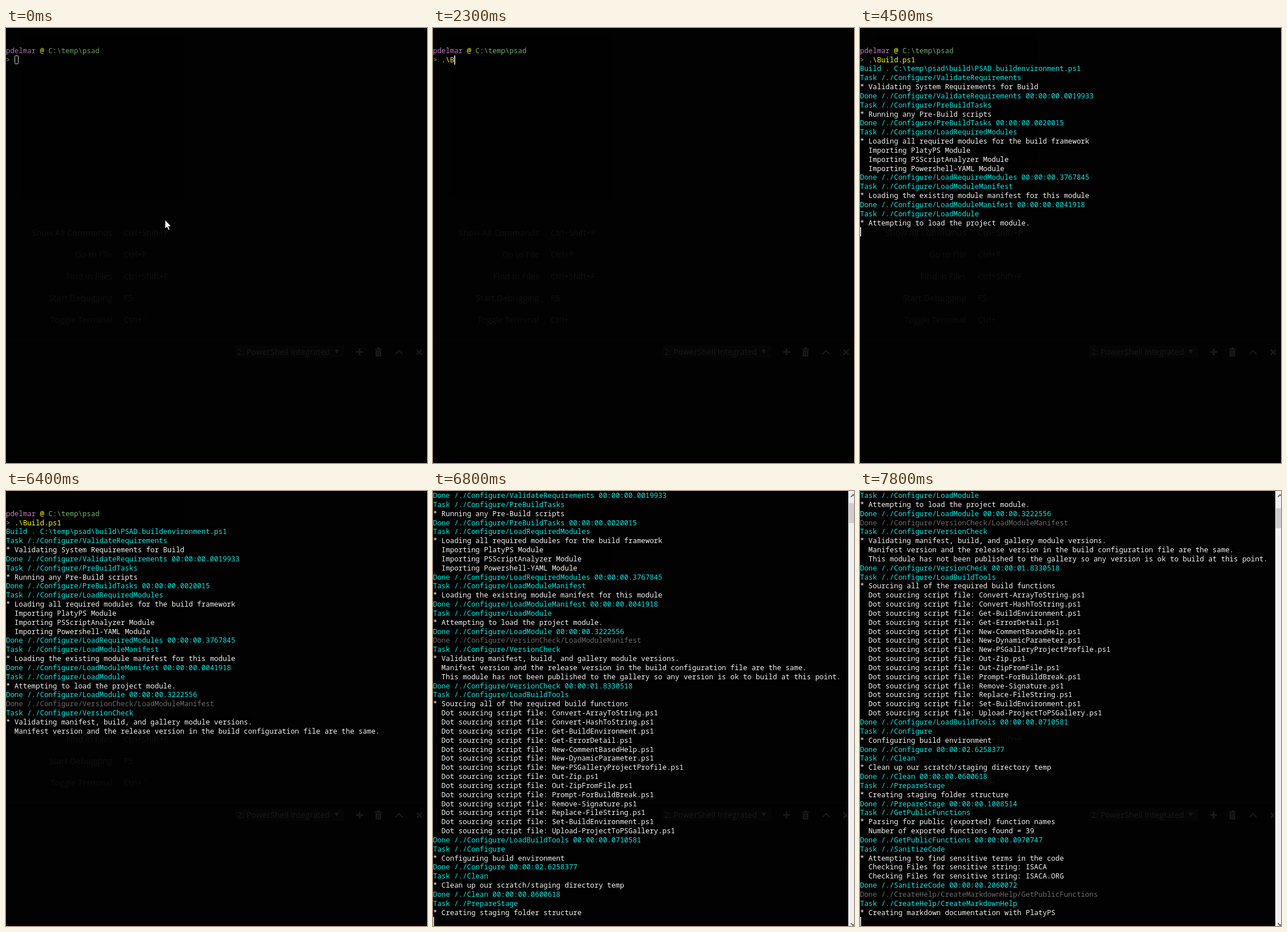
Recreate the animation shown at these times as an HTML page with a canvas. Size 737 by 760 pixels, loop 8 s.

```html
<!DOCTYPE html>
<html lang="en">
<head>
<meta charset="utf-8">
<title>Module build in a terminal</title>
<style>
  html, body { margin: 0; width: 100%; height: 100%; overflow: hidden; background: #020202; }
  canvas { display: block; }
</style>
</head>
<body>
<canvas id="stage" width="737" height="760"></canvas>
<script>
const W = 737, H = 760, LOOP = 8000;
const CELL = 7.435, LINE = 15.84, ROWS = 48;
const MONO = '12.4px "Noto Sans Mono", monospace';
const CYAN = '#00eeee', WHITE = '#f4f4f4', GREY = '#6c6c6c';
const GREEN = '#6cb365', PURPLE = '#c678c4', YELLOW = '#ffff00';
const ctx = document.getElementById('stage').getContext('2d');

const sourced = `Convert-ArrayToString Convert-HashToString Get-BuildEnvironment
Get-ErrorDetail New-CommentBasedHelp New-DynamicParameter
New-PSGalleryProjectProfile Out-Zip Out-ZipFromFile Prompt-ForBuildBreak
Remove-Signature Replace-FileString Set-BuildEnvironment
Upload-ProjectToPSGallery`.split(/\s+/)
  .map(name => `  Dot sourcing script file: ${name}.ps1`).join('\n');

// Output starts on terminal row 4, below the prompt.
const FIRST = 4;
const output = String.raw`Build . C:\temp\psad\build\PSAD.buildenvironment.ps1
Task /./Configure/ValidateRequirements
* Validating System Requirements for Build
Done /./Configure/ValidateRequirements 00:00:00.0019933
Task /./Configure/PreBuildTasks
* Running any Pre-Build scripts
Done /./Configure/PreBuildTasks 00:00:00.0020015
Task /./Configure/LoadRequiredModules
* Loading all required modules for the build framework
  Importing PlatyPS Module
  Importing PSScriptAnalyzer Module
  Importing Powershell-YAML Module
Done /./Configure/LoadRequiredModules 00:00:00.3767845
Task /./Configure/LoadModuleManifest
* Loading the existing module manifest for this module
Done /./Configure/LoadModuleManifest 00:00:00.0041918
Task /./Configure/LoadModule
* Attempting to load the project module.
Done /./Configure/LoadModule 00:00:00.3222556
Done /./Configure/VersionCheck/LoadModuleManifest
Task /./Configure/VersionCheck
* Validating manifest, build, and gallery module versions.
  Manifest version and the release version in the build configuration file are the same.
  This module has not been published to the gallery so any version is ok to build at this point.
Done /./Configure/VersionCheck 00:00:01.8330518
Task /./Configure/LoadBuildTools
* Sourcing all of the required build functions
${sourced}
Done /./Configure/LoadBuildTools 00:00:00.0710581
Task /./Configure
* Configuring build environment
Done /./Configure 00:00:02.6258377
Task /./Clean
* Clean up our scratch/staging directory temp
Done /./Clean 00:00:00.0600618
Task /./PrepareStage
* Creating staging folder structure
Done /./PrepareStage 00:00:00.1008514
Task /./GetPublicFunctions
* Parsing for public (exported) function names
  Number of exported functions found = 39
Done /./GetPublicFunctions 00:00:00.0970747
Task /./SanitizeCode
* Attempting to find sensitive terms in the code
  Checking Files for sensitive string: ISACA
  Checking Files for sensitive string: ISACA.ORG
Done /./SanitizeCode 00:00:00.2060072
Done /./CreateHelp/CreateMarkdownHelp/GetPublicFunctions
Task /./CreateHelp/CreateMarkdownHelp
* Creating markdown documentation with PlatyPS`.split('\n');

const COMMAND = String.raw`.\Build.ps1`;

// Each track is a list of [start time, value].
const typed = [[0, 0], [1700, 1], [1900, 2], [2300, 3], [2400, 5], [2500, 6],
  [2700, 7], [2800, 8], [3000, 9], [3200, 10], [3400, 11]];
const cursorLine = [[0, 3], [3900, 4], [4100, 7], [4200, 13], [4300, 15], [4500, 22],
  [4800, 27], [6700, 41], [6800, 54], [6900, 57], [7000, 62], [7200, 63], [7300, 67]];
const cursorOn = [[0, 1], [900, 0], [1400, 1], [5400, 0], [5900, 1], [6400, 0],
  [6700, 1], [7300, 0], [7800, 1]];
const textAlpha = [[0, 0.9], [200, 0.95], [300, 1]];
const pointer = [[0, [278.5, 335.5]], [200, [282, 335]], [300, [284.5, 334]], [600, null]];

const at = (track, t) => track.findLast(step => step[0] <= t)[1];

function rect(color, x, y, w, h) {
  ctx.fillStyle = color;
  ctx.fillRect(x, y, w, h);
}

function shape(points, fill, stroke, width = 1) {
  ctx.beginPath();
  points.forEach(([x, y]) => ctx.lineTo(x, y));
  if (fill) { ctx.closePath(); ctx.fillStyle = fill; ctx.fill(); }
  if (stroke) { ctx.strokeStyle = stroke; ctx.lineWidth = width; ctx.stroke(); }
}

function label(text, x, y, size, color, align = 'left') {
  ctx.font = `${size}px "Open Sans", sans-serif`;
  ctx.textAlign = align;
  ctx.fillStyle = color;
  ctx.fillText(text, x, y);
}

// Places one character per terminal cell, on an opaque background.
function cells(text, col, row, color, alpha = 1) {
  const top = Math.round(row * LINE);
  rect('#000', col * CELL, top, text.length * CELL, Math.round((row + 1) * LINE) - top);
  ctx.font = MONO;
  ctx.textAlign = 'left';
  ctx.fillStyle = color;
  ctx.globalAlpha = alpha;
  const base = Math.round(row * LINE + 12);
  [...text].forEach((ch, i) => ctx.fillText(ch, (col + i) * CELL, base));
  ctx.globalAlpha = 1;
}

function lineColor(text) {
  if (/^Done \S+$/.test(text)) return GREY;
  return /^(Task|Done|Build)/.test(text) ? CYAN : WHITE;
}

function drawEditor() {
  const dim = '#0f0f0f', icon = '#181818';
  rect('#020202', 0, 0, W, H);
  rect('#010101', 28, 13, 284, 284);
  [['Show All Commands', 'Ctrl+Shift+P'], ['Go to File', 'Ctrl+P'],
   ['Find in Files', 'Ctrl+Shift+F'], ['Start Debugging', 'F5'],
   ['Toggle Terminal', 'Ctrl+`']].forEach(([name, keys], i) => {
    const y = Math.round(362.5 + i * 38.15);
    label(name, 186, y, 14.8, dim, 'right');
    label(keys, 206, y, 14.4, dim);
  });
  rect('#060606', 0, 544, W, 1);
  rect('#050505', 401, 555, 191, 21);
  label('2: PowerShell Integrated', 405, 571, 14.3, icon);
  shape([[575, 562], [583, 562], [579, 569]], icon);
  rect(icon, 613, 564.5, 12, 3);
  rect(icon, 617.5, 560, 3, 12);
  rect(icon, 646, 560, 12, 2);
  rect(icon, 650, 558, 4, 2);
  rect(icon, 647, 563, 10, 11);
  rect('#080808', 650, 565, 1, 7);
  rect('#080808', 653, 565, 1, 7);
  shape([[682, 570], [688, 563.5], [694, 570]], null, icon, 2.2);
  shape([[719, 562], [728, 571]], null, icon, 2.5);
  shape([[728, 562], [719, 571]], null, icon, 2.5);
  rect('#060106', 0, 756, W, 4);
}

function drawScrollbar(scroll) {
  rect('#f0f0f0', 727, 0, 10, H);
  rect('#cdcdcd', 728, Math.round(16.5 + scroll * 0.68), 9, 35);
  shape([[731.5, 10.5], [735.5, 6.5], [739.5, 10.5]], null, '#555', 1.6);
  shape([[731.5, 755], [735.5, 759], [739.5, 755]], null, '#555', 1.6);
}

function drawCursor(t, line, scroll, count) {
  const col = line === 3 ? 2 + count : 0;
  const x = Math.round(col * CELL), y = Math.round((line - scroll) * LINE);
  if (t < 200) {
    ctx.strokeStyle = '#cfcfcf';
    ctx.lineWidth = 1;
    ctx.beginPath();
    ctx.roundRect(x + 0.5, y + 0.5, 6, 14, 1);
    ctx.stroke();
  } else if (at(cursorOn, t)) {
    rect('#c4c4c4', x, y, 2, 16);
  }
}

function drawPointer([x, y]) {
  const outline = [[0, 0], [0, 15], [3.3, 12], [5.8, 17.4], [8.2, 16.4], [5.7, 11.2], [10.5, 11]];
  shape([...outline, outline[0]].map(([a, b]) => [x + a, y + b]), '#fff', '#000', 0.7);
}

function draw(t) {
  const line = at(cursorLine, t), count = at(typed, t), alpha = at(textAlpha, t);
  const scroll = Math.max(0, line - ROWS + 1);
  drawEditor();
  if (scroll < 3) {
    cells('pdelmar', 0, 2 - scroll, PURPLE, alpha);
    cells('@', 8, 2 - scroll, YELLOW, alpha);
    cells(String.raw`C:\temp\psad`, 10, 2 - scroll, GREEN, alpha);
    cells('>', 0, 3 - scroll, GREEN, alpha);
    cells(COMMAND.slice(0, count), 2, 3 - scroll, YELLOW);
  }
  for (let i = Math.max(FIRST, scroll); i < line; i++) {
    const text = output[i - FIRST];
    cells(text, 0, i - scroll, lineColor(text));
  }
  drawCursor(t, line, scroll, count);
  if (scroll) drawScrollbar(scroll);
  const spot = at(pointer, t);
  if (spot) drawPointer(spot);
}

const start = performance.now();
function tick() {
  draw((performance.now() - start) % LOOP);
  requestAnimationFrame(tick);
}
tick();
</script>
</body>
</html>
```
